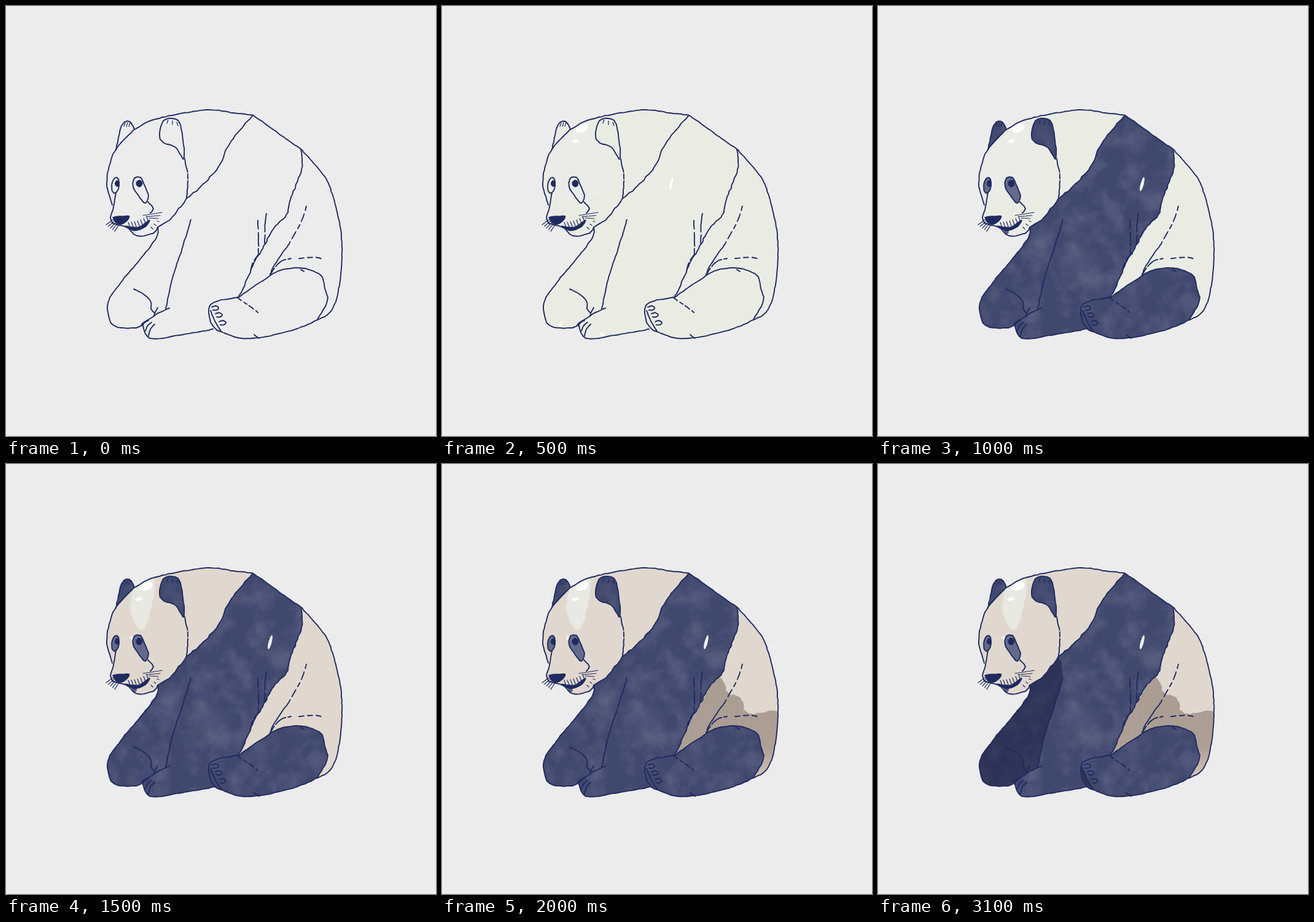
Recreate the animation shown at these times as an HTML page. Size 700 px wide and 700 px high, loop 3500 ms.

```html
<!DOCTYPE html>
<html lang="en">
<head>
<meta charset="utf-8">
<title>Panda</title>
<style>
html, body { margin: 0; width: 100%; height: 100%; overflow: hidden; background: #ececec; }
svg { display: block; width: 100%; height: 100%; }
.layer { opacity: 0; animation: 3.5s step-end infinite; }
#base { animation-name: base; }
#dark { animation-name: dark; }
#cream { animation-name: cream; }
#shade { animation-name: shade; }
#arm { animation-name: arm; }
@keyframes base { 0% { opacity: 0 } 14.2857%, 100% { opacity: 1 } }
@keyframes dark { 0% { opacity: 0 } 28.5714%, 100% { opacity: 1 } }
@keyframes cream { 0% { opacity: 0 } 42.8571%, 100% { opacity: 1 } }
@keyframes shade { 0% { opacity: 0 } 57.1428%, 100% { opacity: 1 } }
@keyframes arm { 0% { opacity: 0 } 71.4285%, 100% { opacity: 1 } }
#lines { fill: none; stroke: #1f2a5f; stroke-width: 1.9; stroke-linecap: round; stroke-linejoin: round; }
#lines .thin { stroke-width: 1.2; }
#lines .ink { fill: #1f2a5f; stroke-width: 1; }
</style>
</head>
<body>
<svg viewBox="0 0 700 700">
  <defs>
    <filter id="wash" x="150" y="150" width="410" height="410" filterUnits="userSpaceOnUse" color-interpolation-filters="sRGB">
      <feTurbulence type="fractalNoise" baseFrequency=".03" numOctaves="5" seed="9"/>
      <feColorMatrix values="0 0 0 0 .55  0 0 0 0 .56  0 0 0 0 .66  .7 0 0 0 -.28"/>
      <feComposite operator="in" in2="SourceGraphic"/>
    </filter>
    <radialGradient id="pale">
      <stop offset="0" stop-color="#8c8da5" stop-opacity=".22"/>
      <stop offset="1" stop-color="#8c8da5" stop-opacity="0"/>
    </radialGradient>
    <linearGradient id="brown" x1="0" y1="345" x2="0" y2="510" gradientUnits="userSpaceOnUse">
      <stop offset="0" stop-color="#a99c92"/>
      <stop offset=".7" stop-color="#ae9f95"/>
      <stop offset="1" stop-color="#cfc2b7"/>
    </linearGradient>
    <clipPath id="inBody"></clipPath>
  </defs>
  <g id="base" class="layer"></g>
  <g id="cream" class="layer"></g>
  <g id="shade" class="layer"></g>
  <g id="dark" class="layer"></g>
  <g id="arm" class="layer"></g>
  <g id="lines"></g>
</svg>
<script>
const $ = id => document.getElementById(id);

let seed = 7;
const random = () => (seed = seed * 16807 % 2147483647) / 2147483647;

function points(text) {
  const n = text.split(' ').map(Number), out = [];
  for (let i = 0; i < n.length; i += 2) out.push([n[i], n[i + 1]]);
  return out;
}

// Smooth curve through key points, sampled every few pixels with a shaky hand.
function sketch(keys, shake = .5, closed = false) {
  const n = keys.length, out = [];
  const at = i => closed ? keys[(i + n) % n] : keys[Math.max(0, Math.min(n - 1, i))];
  for (let i = 0; i < (closed ? n : n - 1); i++) {
    const [a, b, c, d] = [at(i - 1), at(i), at(i + 1), at(i + 2)];
    const steps = Math.max(2, Math.round(Math.hypot(c[0] - b[0], c[1] - b[1]) / 5));
    for (let s = 0; s < steps; s++) {
      const t = s / steps, wobble = s ? shake : 0;
      out.push(b.map((v, k) => v + .5 * t * (c[k] - a[k]
        + t * (2 * a[k] - 5 * v + 4 * c[k] - d[k])
        + t * t * (3 * v - a[k] - 3 * c[k] + d[k])) + (random() * 2 - 1) * wobble));
    }
  }
  if (!closed) out.push(keys[n - 1]);
  return out;
}

const oval = (x, y, rx, ry, turn = 0) => sketch(Array.from({ length: 8 }, (_, i) => {
  const a = i * Math.PI / 4, u = rx * Math.cos(a), v = ry * Math.sin(a), r = turn * Math.PI / 180;
  return [x + u * Math.cos(r) - v * Math.sin(r), y + u * Math.sin(r) + v * Math.cos(r)];
}), .3, true);

const contour = (text, shake) => sketch(points(text), shake);
const loop = (text, shake) => sketch(points(text), shake, true);

// Contours shared by fills and lines
const shape = {
  headL: contour('209 201 186 224 172 247 164 288 173 324'),
  snout: contour('179 304 175 327 170 345 174 354'),
  chin: contour('174 354 196 360 213 374 240 370 247 360'),
  cheek: contour('294 313 276 338 262 351 247 360', 2),
  headR: contour('291 249 296 279 294 313'),
  earL: contour('179 234 188 195 201 188 209 201'),
  earR: loop('250 211 256 187 270 183 284 193 290 248 276 230 257 223'),
  top: contour('209 201 237 186 280 176 331 169 370 174 402 178'),
  backA: contour('402 178 421 191 448 211 480 233'),
  backB: contour('480 233 512 269 527 294 542 348 547 400 541 464 528 498 507 511'),
  chest: contour('402 178 383 200 362 228 345 263 315 296 294 313', 1),
  rear: contour('480 233 481 266 463 315 456 340 433 366 418 395 403 419 387 458 379 474', 1),
  legTop: contour('379 474 415 449 448 430 484 427 512 438 519 460 523 480 507 511'),
  legLow: contour('507 511 475 525 424 538 384 541 344 528'),
  sole: contour('344 528 333 515 331 490 346 480 379 474'),
  pawTop: contour('266 492 243 503 222 517'),
  pawLow: contour('222 517 234 541 282 536 337 526'),
  farArm: contour('247 360 245 377 217 414 187 450 166 483 174 519 212 524 222 517'),
  armIn: contour('301 348 288 391 272 439 260 494'),
  eyeL: oval(178, 292, 6, 13, 8),
  eyeR: loop('207 294 209 280 219 279 225 291 232 308 227 321 217 311')
};

const body = '-headL top backA backB legLow -pawLow -farArm -chin -snout';
const torso = 'chest cheek farArm pawLow sole -rear -backA';
const leg = 'legTop legLow sole';
const farLimb = 'cheek farArm -pawTop -armIn';

// Joins named contours; a leading minus walks one backwards.
const chain = names => names.split(' ').flatMap(name =>
  name[0] === '-' ? shape[name.slice(1)].slice().reverse() : shape[name]);

function add(parent, pts, attrs) {
  const el = document.createElementNS('http://www.w3.org/2000/svg', 'path');
  el.setAttribute('d', 'M' + pts.map(p => p.map(v => v.toFixed(1))).join('L'));
  for (const k in attrs) el.setAttribute(k, attrs[k]);
  $(parent).appendChild(el);
}

const fill = (id, pts, color, extra) => add(id, pts, { fill: color, ...extra });
const line = (text, dash = 'none', cls = '') => add('lines', contour(text), { class: cls, 'stroke-dasharray': dash });
const hair = (...n) => add('lines', [n.slice(0, 2), n.slice(2)], { class: 'thin' });
const ink = pts => add('lines', [...pts, pts[0]], { class: 'ink' });

const clip = { 'clip-path': 'url(#inBody)' };
add('inBody', chain(body));

function whites(id) {
  fill(id, oval(228, 199, 11, 7, -25), '#fcfdfb', clip);
  fill(id, oval(217, 220, 6, 3, -15), '#fcfdfb');
}

// Pale undercoat
for (const part of [body, 'earL', 'earR']) fill('base', chain(part), '#eaece4');
fill('base', oval(222, 262, 50, 58), '#ebebe8', clip);
whites('base');
fill('base', oval(373, 290, 2, 10, 15), '#fff');
fill('base', oval(193, 518, 3, 4), '#f9faf7');
fill('base', oval(261, 534, 4, 3), '#f9faf7');

// Warm fur
fill('cream', chain(body), '#e0d8ce');
fill('cream', loop('210 196 203 240 220 271 234 246 241 188', 1.5), '#e7e9e2', clip);
whites('cream');
fill('cream', oval(205, 283, 3, 4), '#f0f1ec');
fill('shade', loop('380 474 415 400 450 348 466 372 486 380 499 406 548 406 548 470 510 514', 1.5), 'url(#brown)', clip);

// Dark coat
for (const part of [torso, leg, 'earL', 'earR']) {
  fill('dark', chain(part), '#41486e');
  fill('dark', chain(part), '#000', { filter: 'url(#wash)' });
}
fill('dark', oval(266, 393, 26, 42), 'url(#pale)');
fill('dark', oval(332, 425, 38, 45), 'url(#pale)');
fill('dark', chain('eyeL'), '#646a8b');
fill('dark', chain('eyeR'), '#646a8b');
fill('dark', oval(209, 368, 4, 4), '#5a6084');
fill('dark', oval(430, 290, 2.6, 12, 15), '#f0f1ee');

// Shadowed far limb
const far = [...chain(farLimb), [299, 325]];
fill('arm', far, '#2e3256');
fill('arm', far, '#000', { filter: 'url(#wash)', opacity: .4 });
fill('arm', loop('331 490 338 508 350 530 333 514'), '#2e3256');

// Ink contours
for (const name in shape)
  add('lines', shape[name], { 'stroke-dasharray': name === 'headR' ? '22 3 8 3 60' : 'none' });
for (const name of ['earR', 'eyeL', 'eyeR']) add('lines', [shape[name].at(-1), shape[name][0]]);
line('231 319 240 330 235 337');

// Face
ink(oval(181, 289, 3.4, 5));
ink(oval(217, 289, 5, 5.5));
ink(loop('174 344 187 342 201 342 197 350 187 356 179 353'));
ink(loop('195 358 215 360 234 348 228 359 208 366'));
for (let i = 0; i < 7; i++) hair(199 + 5 * i, 352 - i * i / 4, 202 + 5 * i, 360 - i * i / 4);
for (let i = 0; i < 5; i++) hair(174 + 2.5 * i, 348 + 2 * i, 163 + 3.5 * i, 356 + 2.7 * i);
for (let i = 0; i < 3; i++) hair(223 + 5 * i, 341 + 2 * i, 254 - 3 * i, 336 + 5 * i);
for (let i = 0; i < 3; i++) {
  hair(194 + 4 * i, 190, 192 + 4 * i, 196);
  hair(264 + 7 * i, 185 + 2 * i, 262 + 9 * i, 191 + 2 * i);
  hair(236 + 5 * i, 360 - 5 * i, 239 + 5 * i, 363 - 6 * i);
}

// Paws
line('208 461 221 467 235 480 236 493 241 499');
line('241 505 243 498 247 491');
for (let i = 0; i < 3; i++) {
  line([222 + 5 * i, 521 + 8 * i, 225 + 5 * i, 516 + 5 * i, 232 + 5 * i, 512 + 3 * i].join(' '));
  const [x, y] = [340 + 6 * i, 492 + 10 * i + i * i];
  line([x - 5, y - 2, x + 1, y - 4, x + 6, y - 1, x + 3, y + 3, x - 3, y + 3].join(' '));
}
line('333 496 338 508 350 530');
line('376 474 390 484 410 499', '9 5 6 4');

// Creases in the fur
line('410 349 411 376 411 404', '14 6 22 4');
line('424 338 422 353 421 386', '30 5');
line('411 404 401 420 398 434', '12 5');
line('489 326 481 350 459 390', '7 6 13 6');
line('459 390 438 420 430 437');
line('430 437 446 417 464 411', '12 4 20 4');
line('477 411 500 409 518 412', '8 6');
line('480 429 485 432');
line('404 535 412 541');
</script>
</body>
</html>
```
